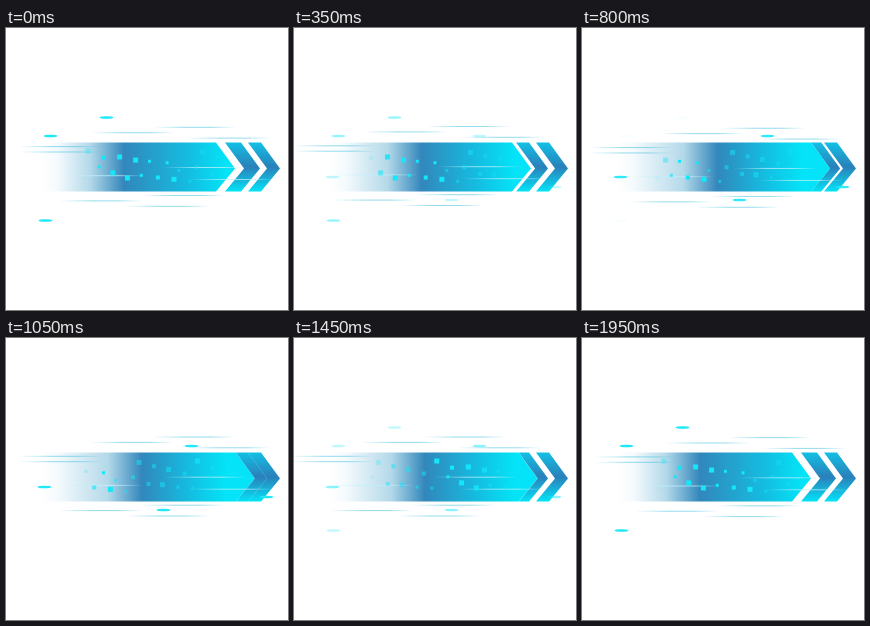
These frames come from a looping animation (282x282 px, 2 s). An HTML page with a canvas:

```html
<!DOCTYPE html>
<html>
<head>
<meta charset="utf-8">
<style>
html, body { margin: 0; width: 100%; height: 100%; overflow: hidden; background: #fff; }
canvas { display: block; }
</style>
</head>
<body>
<canvas id="stage" width="282" height="282"></canvas>
<script>
const ctx = document.getElementById('stage').getContext('2d');
const TOP = 114.6, MID = 140.5, BOTTOM = 163.5, SLANT = 19;
const CYAN = '#04e3f7', BLUE = '#2a80ba';
const SQUARES = 23, SPAN = 173, LEFT = 70;

// Centres of the dashes shown at the open and at the closed pose
const openDashes = [[100.5, 89.5], [44.5, 108], [39.5, 192.5]];
const closedDashes = [[185.5, 108], [38.5, 149], [157.5, 172], [260.5, 159]];

const clamp = v => Math.max(0, Math.min(1, v));
const wrap = (v, n) => (v % n + n) % n;
const random = seed => wrap(Math.sin(seed * 12.9898) * 43758.5453, 1);

function gradient(x0, y0, x1, y1, stops) {
  const g = ctx.createLinearGradient(x0, y0, x1, y1);
  stops.forEach(([at, color]) => g.addColorStop(at, color));
  return g;
}

function shape(points, fill) {
  ctx.fillStyle = fill;
  ctx.beginPath();
  points.forEach(([x, y]) => ctx.lineTo(x, y));
  ctx.fill();
}

function chevron(inner, outer) {
  shape([
    [inner - SLANT, TOP], [outer - SLANT, TOP], [outer, MID],
    [outer - SLANT, BOTTOM], [inner - SLANT, BOTTOM], [inner, MID]
  ], gradient(0, TOP, 0, BOTTOM, [[0, '#12c0e4'], [0.5, BLUE], [1, CYAN]]));
}

function bar(tip, edge) {
  const at = x => (x - 35) / 210;
  shape([[35, TOP], [tip - SLANT, TOP], [tip, MID], [tip - SLANT, BOTTOM], [35, BOTTOM]],
    gradient(35, 0, 245, 0, [
      [0, '#fff'], [at(52), '#f4fafd'], [at(edge - 34), '#b4d9e9'],
      [at(edge), '#3287bb'], [at(185), '#13bfe2'], [at(220), CYAN], [1, CYAN]
    ]));
}

// Streaks stacked downwards from y, one for each centre
function streaks(centres, y, step, shift, rgb, alpha) {
  centres.forEach((centre, i) => {
    const x = centre - 42 + shift;
    const clear = `rgba(${rgb},0)`, solid = `rgba(${rgb},${alpha})`;
    ctx.fillStyle = gradient(x, 0, x + 84, 0, [[0, clear], [0.4, solid], [0.7, solid], [1, clear]]);
    ctx.fillRect(x, y + i * step - 0.5, 84, 1);
  });
}

function squares(travel) {
  ctx.fillStyle = '#16e6fa';
  for (let i = 0; i < SQUARES; i++) {
    const start = 84 + i * SPAN / SQUARES + 4 * (random(i) - 0.5);
    const x = LEFT + wrap(start - travel - LEFT, SPAN);
    const y = 123 + 32 * wrap(i * 0.54 + 0.05 + 0.25 * (random(i + 50) - 0.5), 1);
    const size = 3 + Math.floor(3 * random(i + 90));
    const strength = i < SQUARES / 2 ? 1 : 0.5;
    ctx.globalAlpha = strength * clamp((x - LEFT - 4) / 22) * clamp((228 - x) / 55);
    ctx.fillRect(x - size / 2, y - size / 2, size, size);
  }
  ctx.globalAlpha = 1;
}

function dashes(centres, alpha) {
  ctx.fillStyle = '#1ee8f8';
  ctx.globalAlpha = alpha;
  for (const [x, y] of centres) {
    ctx.beginPath();
    ctx.ellipse(x, y, 7, 1.3, 0, 0, 7);
    ctx.fill();
  }
  ctx.globalAlpha = 1;
}

function draw(t) {
  const swing = Math.sin(Math.PI * t / 1950);
  const closed = swing ** 2;
  const travel = t < 1000 ? t * 0.0575 : 57.5 + (t - 1000) * 0.1216;
  const inner = 238 + 11 * closed;

  ctx.fillStyle = '#fff';
  ctx.fillRect(0, 0, 282, 282);
  bar(Math.min(inner, 229 + 28 * closed), 118 + 18 * swing);
  chevron(inner, 254 + 8 * closed ** 8);
  chevron(261, 274);

  // Streaks circle twice per loop
  const orbit = 2 * Math.PI * t / 1000;
  const dx = 9 * (Math.cos(orbit) - 1), dy = 0.3 - Math.sin(orbit);
  const outside = (centres, y) => streaks(centres, y + dy, 5.4, dx, '60,190,220', 0.55);
  outside([188, 126, 223], 99);
  outside([55, 55], 118.3);
  outside([177, 95, 162], 167.2);
  streaks([200, 96], 139.2 + dy, 8.2, dx, '190,240,250', 0.75);
  streaks([225], 151.2 + dy, 0, dx, '190,240,250', 0.75);

  squares(travel);
  dashes(openDashes, 1 - swing);
  dashes(closedDashes, closed);
}

function tick() {
  draw(Math.floor(performance.now() % 2000 / 50) * 50);
  requestAnimationFrame(tick);
}
tick();
</script>
</body>
</html>
```
